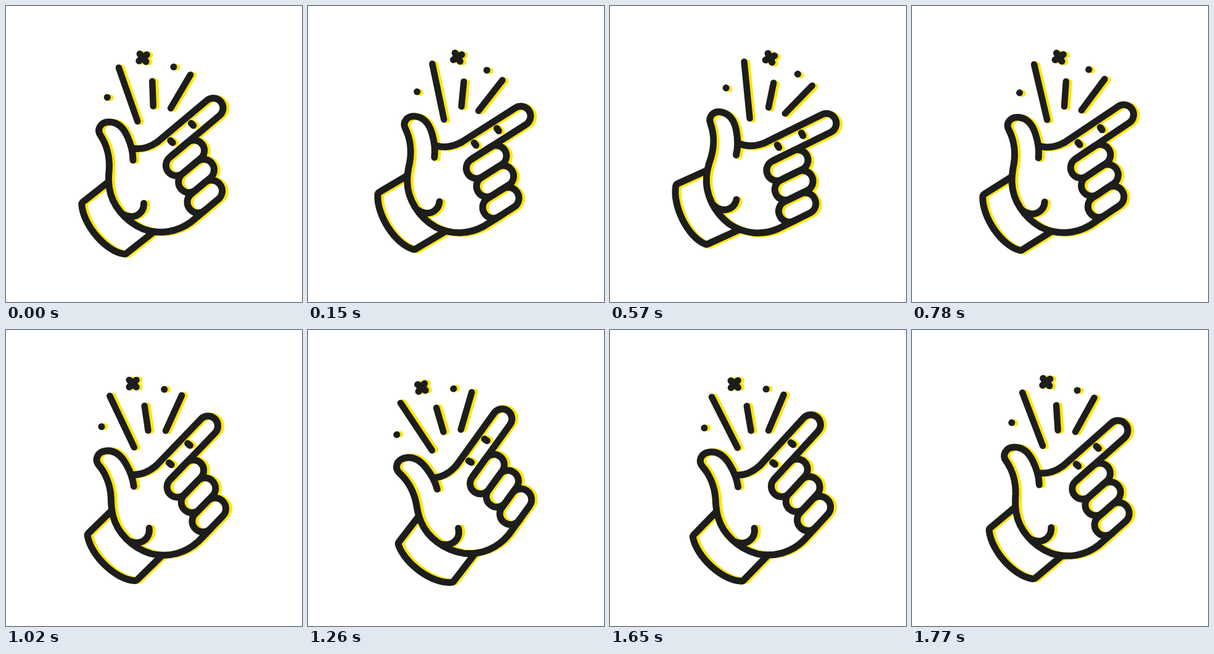
Animation of 480x480 px, one loop 1800 ms. Source, as an HTML page:

```html
<!DOCTYPE html>
<html lang="en">
<head>
<meta charset="utf-8">
<title>Snapping fingers</title>
<style>
  html, body { margin: 0; width: 100%; height: 100%; overflow: hidden; background: #fff; }
  svg { display: block; width: 100vw; height: 100vh; }
</style>
</head>
<body>
<svg viewBox="0 0 480 480">
  <defs>
    <g id="drawing" fill="none" stroke-width="11" stroke-linecap="round" stroke-linejoin="round">
      <!-- rays, star and sparks -->
      <path d="M182.8 100L213.3 187M237.2 122L238.7 162.5M299 111.5L267 165.8" stroke-width="10.5"/>
      <path d="M227 90.2L217 77.8M215.8 89L228.2 79"/>
      <path d="M164.2 148.2h.1M271.8 98.8h.1"/>
      <!-- cuff, palm and thumb -->
      <path d="M165 286L125 317.5Q122.6 319.4 122.8 322C125 354 160 397 191 402.2Q193.6 402.6 195.5 401L238 367.5"/>
      <path d="M206 250Q206 232 197 212C190 196 180 188 167 188C153.5 188 146.5 200 153.3 210
               C163.3 225 168.3 245 167.3 264C166.3 275 165.5 283 167.5 295C171.5 322 192 348.5 222 361.5
               C250 371.5 278 366.5 300 350.3L324 330.3"/>
      <path d="M223.5 320C224 332 215 341.5 203 341.5Q196 341.5 190 338"/>
      <path d="M206 231C220 233 233 229 245 220.7"/>
      <path d="M300.3 190.2L303.7 193.8M266.8 218.3L270.2 221.7"/>
      <!-- fingers, laid out along their own axis -->
      <g transform="rotate(-40)">
        <path d="M46 326.7H151.1a16 16 0 0 1 0 32H47"/>
        <rect x="28.6" y="358.7" width="71" height="33.6" rx="16.8"/>
        <rect x="26.8" y="392.3" width="65" height="34.2" rx="17"/>
        <rect x="16.8" y="426.5" width="63" height="34.7" rx="17"/>
      </g>
    </g>
  </defs>
  <g id="hand">
    <use href="#drawing" stroke="#ffe600" transform="translate(4.8 .5)"/>
    <use href="#drawing" stroke="#1d1d1b"/>
  </g>
</svg>
<script>
  const LOOP = 1800, STEP = 30, SWING = 15;
  const hand = document.getElementById('hand');

  function draw(ms) {
    const time = Math.floor((ms % LOOP) / STEP) * STEP;
    const angle = SWING * Math.sin(2 * Math.PI * time / LOOP);
    hand.setAttribute('transform', `rotate(${angle.toFixed(3)} 240 240)`);
  }

  function tick() {
    draw(performance.now());
    requestAnimationFrame(tick);
  }
  tick();
</script>
</body>
</html>
```
